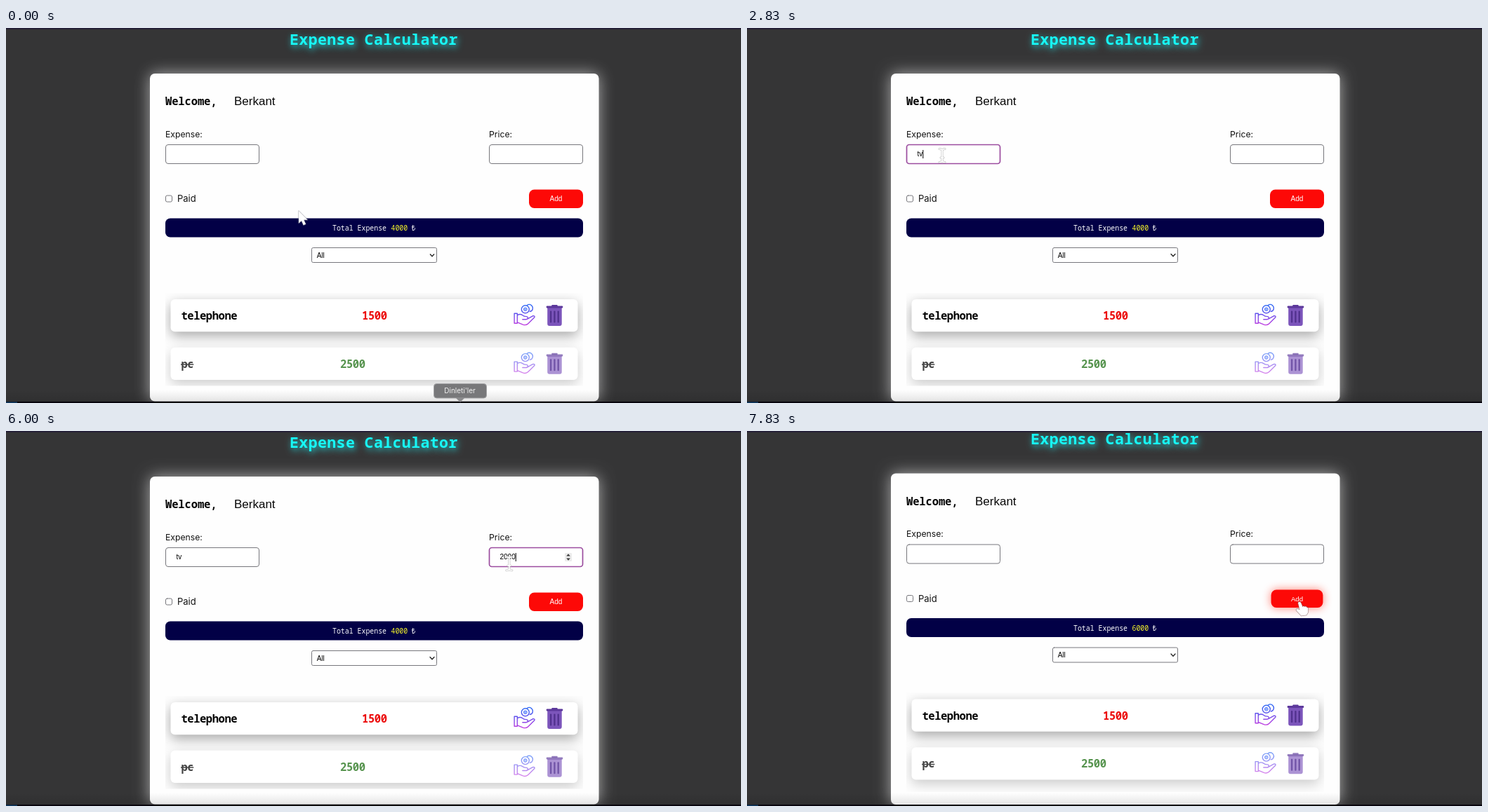
Animation of 1047x535 px, one loop 8 s. Source, as an HTML page with a canvas:

```html
<!DOCTYPE html>
<html lang="en">
<head>
<meta charset="utf-8">
<title>Expense Calculator</title>
<style>
  html, body { margin: 0; width: 100%; height: 100%; overflow: hidden; background: #353536; }
  canvas { display: block; width: 1047px; height: 535px; }
</style>
</head>
<body>
<canvas id="stage" width="1047" height="535"></canvas>
<script>
const ctx = document.getElementById('stage').getContext('2d');
const W = 1047, H = 535, LOOP = 8000, STEP = 1000 / 6;
const MONO = '"Noto Sans Mono", monospace';
const SANS = '"Liberation Sans", Arial, sans-serif';
const ROUND = 'Inter, sans-serif';

// Event times in ms
const FOCUS_EXPENSE = 1490, FOCUS_PRICE = 4320, ADDED = 7660;
const EXPENSE_KEYS = [2660, 2820];
const PRICE_KEYS = [5160, 5320, 5490, 5660];
const RINGS = [[1160, 1490], [4160, 4490], [7490, 7660]];
const BLINK = 530;

// Pointer path: time, x, y
const PATH = [
  [0, 417, 261], [170, 417, 261], [1000, 281, 181], [1170, 281, 181],
  [1500, 278, 182], [2830, 278, 182], [3500, 542, 172], [4000, 715, 182],
  [5830, 715, 182], [6830, 739, 275], [7330, 788, 244], [8000, 788, 244]
];

const EXPENSE_BOX = [227.5, 166.5, 133, 27];
const PRICE_BOX = [688.5, 166.5, 133, 27];
const ADD_BOX = [745, 230.5, 77, 26.5];

const inside = ([x, y, w, h], p) => p.x >= x && p.x <= x + w && p.y >= y && p.y <= y + h;
const ease = u => u * u * (3 - 2 * u);

function pointerAt(t) {
  let i = 1;
  while (i < PATH.length - 1 && t > PATH[i][0]) i++;
  const [t0, x0, y0] = PATH[i - 1], [t1, x1, y1] = PATH[i];
  const u = ease(Math.min(1, (t - t0) / (t1 - t0)));
  return { x: x0 + (x1 - x0) * u, y: y0 + (y1 - y0) * u };
}

function box(x, y, w, h, r, fill, stroke, line = 1) {
  ctx.beginPath();
  ctx.roundRect(x, y, w, h, r);
  if (fill) { ctx.fillStyle = fill; ctx.fill(); }
  if (stroke) { ctx.strokeStyle = stroke; ctx.lineWidth = line; ctx.stroke(); }
}

function text(str, x, y, font, color, spacing = 0, align = 'left') {
  ctx.font = font;
  ctx.letterSpacing = spacing + 'px';
  ctx.textAlign = align;
  ctx.fillStyle = color;
  ctx.fillText(str, x, y);
}

function shape(d, fill, stroke, line = 1) {
  const p = new Path2D(d);
  if (stroke) { ctx.strokeStyle = stroke; ctx.lineWidth = line; ctx.stroke(p); }
  if (fill) { ctx.fillStyle = fill; ctx.fill(p); }
}

function shadow(color, blur, dx = 0, dy = 0) {
  ctx.shadowColor = color;
  ctx.shadowBlur = blur;
  ctx.shadowOffsetX = dx;
  ctx.shadowOffsetY = dy;
}

function at(x, y, draw) {
  ctx.save();
  ctx.translate(x, y);
  draw();
  ctx.restore();
}

function payIcon() {
  const g = ctx.createLinearGradient(0, 0, 0, 30);
  g.addColorStop(0, '#2f6bf5');
  g.addColorStop(0.4, '#5a55ee');
  g.addColorStop(1, '#c23be0');
  ctx.lineJoin = ctx.lineCap = 'round';
  shape('M11 7a5.5 5.5 0 1 0 11 0a5.5 5.5 0 1 0 -11 0', null, g, 1.4);
  shape('M14.3 7a2.2 2.2 0 1 0 4.4 0a2.2 2.2 0 1 0 -4.4 0', '#8fb0ff', g, 1.2);
  shape('M19 1.2Q22 -1 25 1.2Q29 5 25.5 9.2L23 10.2', null, g, 1.4);
  shape('M.8 13H5V27H.8ZM5 15.5Q9 13 12.5 15.5Q14.5 17.5 18 17.3Q21 18 19.6 20.6L18 21.4H12.5' +
    'M19.5 20.8L27 16.5Q30.5 16 29.5 18.5L20.5 27.4Q17.5 30.4 13 28.8L5 25.5', null, g, 1.4);
}

function trashIcon() {
  box(1.5, 4, 20.5, 26, [0, 0, 3, 3], '#7c55bb');
  box(0, 1.6, 23.5, 3, 1, '#5d399c');
  box(7.5, 0, 8.5, 2.5, 1, '#5d399c');
  for (const x of [5.2, 10.5, 15.8]) box(x, 8.5, 2.4, 17, 1, '#52328f');
}

function item(y, label, price, priceX, priceColor, paid) {
  ctx.save();
  shadow(paid ? 'rgba(0,0,0,.2)' : 'rgba(0,0,0,.34)', 18, 0, 6);
  box(234.5, y, 580, 46.3, 6, '#fff');
  ctx.restore();
  const font = '700 15.5px ' + MONO;
  text(label, 249.5, y + 29, font, paid ? '#454545' : '#050505', -0.46);
  text(price, priceX, y + 29, font, priceColor, -0.4);
  if (paid) {
    ctx.fillStyle = '#454545';
    ctx.fillRect(249, y + 23.5, 18.3, 1.5);
  }
  ctx.globalAlpha = paid ? 0.63 : 1;
  at(723.3, y + 7.3, payIcon);
  at(769.7, y + 8, trashIcon);
  ctx.globalAlpha = 1;
}

function field(rect, value, focused, caretOn) {
  const [x, y, w, h] = rect;
  box(x, y, w, h, 3.5, '#fff', focused ? '#9b4c9f' : '#77777c', focused ? 1.7 : 1);
  text(value, x + 15, 183, '10px ' + SANS, '#000');
  if (focused && caretOn) {
    const end = x + 15 + ctx.measureText(value).width;
    ctx.fillStyle = '#000';
    ctx.fillRect(end, 174, 1, 12);
  }
}

function spinner() {
  box(796, 174, 10, 12, 1, '#ececec');
  shape('M798.2 178.6L801 175.3L803.8 178.6ZM798.2 181.4L801 184.7L803.8 181.4Z', '#3a3a3a');
}

// Caret blink restarts on each focus or key press
function blinkOn(t, starts) {
  const last = Math.max(...starts.filter(s => s <= t));
  return (t - last) % (2 * BLINK) < BLINK;
}

const typed = (str, keys, t) => str.slice(0, keys.filter(k => k <= t).length);

function page(t, p) {
  const added = t >= ADDED;
  shadow('rgba(30,235,240,.85)', 10, 2, 3);
  text('Expense Calculator', 404, 23.5, '700 21.5px ' + MONO, '#17f8f6', 0.42);
  shadow('rgba(255,255,255,.6)', 22);
  box(205, 65, 639.5, added ? 472.5 : 467.5, 7, '#fefefe');
  shadow('transparent', 0);

  text('Welcome,', 227, 110, '700 15.5px ' + MONO, '#080808', -0.12);
  text('Berkant', 325, 110, '17px ' + SANS, '#080808');
  text('Expense:', 227, 155.5, '12.2px ' + ROUND, '#111');
  text('Price:', 688, 155.5, '12.2px ' + ROUND, '#111');
  text('Paid', 244, 248, '13px ' + ROUND, '#111');
  box(227.5, 239, 9, 9, 2, '#fff', '#77777c');

  const onExpense = t >= FOCUS_EXPENSE && t < FOCUS_PRICE;
  const onPrice = t >= FOCUS_PRICE && !added;
  field(EXPENSE_BOX, added ? '' : typed('tv', EXPENSE_KEYS, t), onExpense,
    onExpense && blinkOn(t, [FOCUS_EXPENSE, ...EXPENSE_KEYS]));
  field(PRICE_BOX, added ? '' : typed('2000', PRICE_KEYS, t), onPrice,
    onPrice && blinkOn(t, [FOCUS_PRICE, ...PRICE_KEYS]));
  if (onPrice || inside(PRICE_BOX, p)) spinner();

  const [ax, ay, aw, ah] = ADD_BOX;
  const hover = inside(ADD_BOX, p), inset = hover ? 1.6 : 0;
  if (hover) shadow('rgba(255,40,20,.6)', 13);
  box(ax + inset, ay + inset / 3, aw - 2 * inset, ah - inset * 0.7, 7.5, '#fd0907');
  shadow('transparent', 0);
  text('Add', 783.5, 247, (hover ? 9.6 : 10) + 'px ' + SANS, '#fff', 0, 'center');

  box(227, 271.5, 595, 27, 7, '#020046');
  const font = '9.9px ' + MONO;
  text('Total Expense', 465, 289, font, '#fff');
  text(added ? '6000' : '4000', 548.5, 289, font, '#f7f52a');
  text('₺', 577.5, 289, font, '#fff');

  box(435.5, 313.5, 178, 21, 2, '#fff', '#77777c');
  text('All', 442.7, 327.5, '10px ' + SANS, '#000');
  shape('M604 322.5L607 325.7L610 322.5', null, '#222', 1.3);

  ctx.save();
  ctx.beginPath();
  ctx.rect(227, 378, 595, added ? 141.5 : 132.5);
  ctx.clip();
  item(387, 'telephone', '1500', 507, '#ec0d0d', false);
  item(455.8, 'pc', '2500', 476, '#57944f', true);
  ctx.restore();
}

function tooltip() {
  ctx.save();
  box(609.5, 507.5, 75, 20.5, 4, '#78787a', '#a3a3a5');
  shape('M640.5 527.5L647 534L653.5 527.5Z', '#8b8b8d');
  text('Dinleti\'ler', 646.5, 521, '10px Inter, sans-serif', '#f1f1f1', 0, 'center');
  ctx.restore();
}

function pointer(p) {
  const rim = p.y > 200 ? 'rgba(120,120,130,.55)' : 'rgba(140,140,140,.75)';
  ctx.lineJoin = ctx.lineCap = 'round';
  at(p.x, p.y, () => {
    if (inside(EXPENSE_BOX, p) || inside(PRICE_BOX, p)) {
      const beam = 'M-4 -9.5Q0 -9.5 0 -7V7Q0 9.5 -4 9.5M4 -9.5Q0 -9.5 0 -7M0 7Q0 9.5 4 9.5M-2 3H2';
      shape(beam, null, 'rgba(160,160,160,.65)', 3);
      shape(beam, null, '#fff', 1.7);
    } else if (inside(ADD_BOX, p)) {
      shape('M-3 1Q-1 -1.5 1 1L3.5 7Q5 5 6.5 7Q8 5.5 9 7.5Q11 7 11.2 10L11 15L9 18.5L1.5 19.5' +
        'L-5.5 12Q-6 9 -3 10L-.5 11.5Z', '#fff', 'rgba(130,100,100,.7)', 1.4);
    } else {
      shape('M0 0V17.5L4 14L6.7 20.3L10 18.8L7.3 12.8H12.6Z', '#fff', rim, 1.3);
    }
  });
}

function render(t) {
  const p = pointerAt(t);
  ctx.fillStyle = '#353536';
  ctx.fillRect(0, 0, W, H);
  at(0, t >= ADDED ? -4.5 : 0, () => page(t, p));

  const fade = ctx.createLinearGradient(0, 516, 0, 533);
  fade.addColorStop(0, 'rgba(0,0,0,0)');
  fade.addColorStop(1, 'rgba(0,0,0,.1)');
  ctx.fillStyle = fade;
  ctx.fillRect(0, 516, W, 17);

  ctx.fillStyle = '#211c35';
  ctx.fillRect(0, 0, W, 1.7);
  ctx.fillStyle = '#08050d';
  ctx.fillRect(0, 533, W, 2);
  ctx.fillStyle = '#123f68';
  ctx.fillRect(0, 533.5, 16, 1.5);

  if (t < 320) tooltip();
  if (RINGS.some(([a, b]) => t >= a && t < b)) {
    ctx.beginPath();
    ctx.arc(p.x - 3, p.y - 3.5, 24.7, 0, Math.PI * 2);
    ctx.strokeStyle = '#111';
    ctx.lineWidth = 1.4;
    ctx.stroke();
  }
  pointer(p);
}

function tick(now) {
  const t = now % LOOP;
  render(Math.floor((t + 4) / STEP) * STEP % LOOP);
  requestAnimationFrame(tick);
}
requestAnimationFrame(tick);
</script>
</body>
</html>
```
